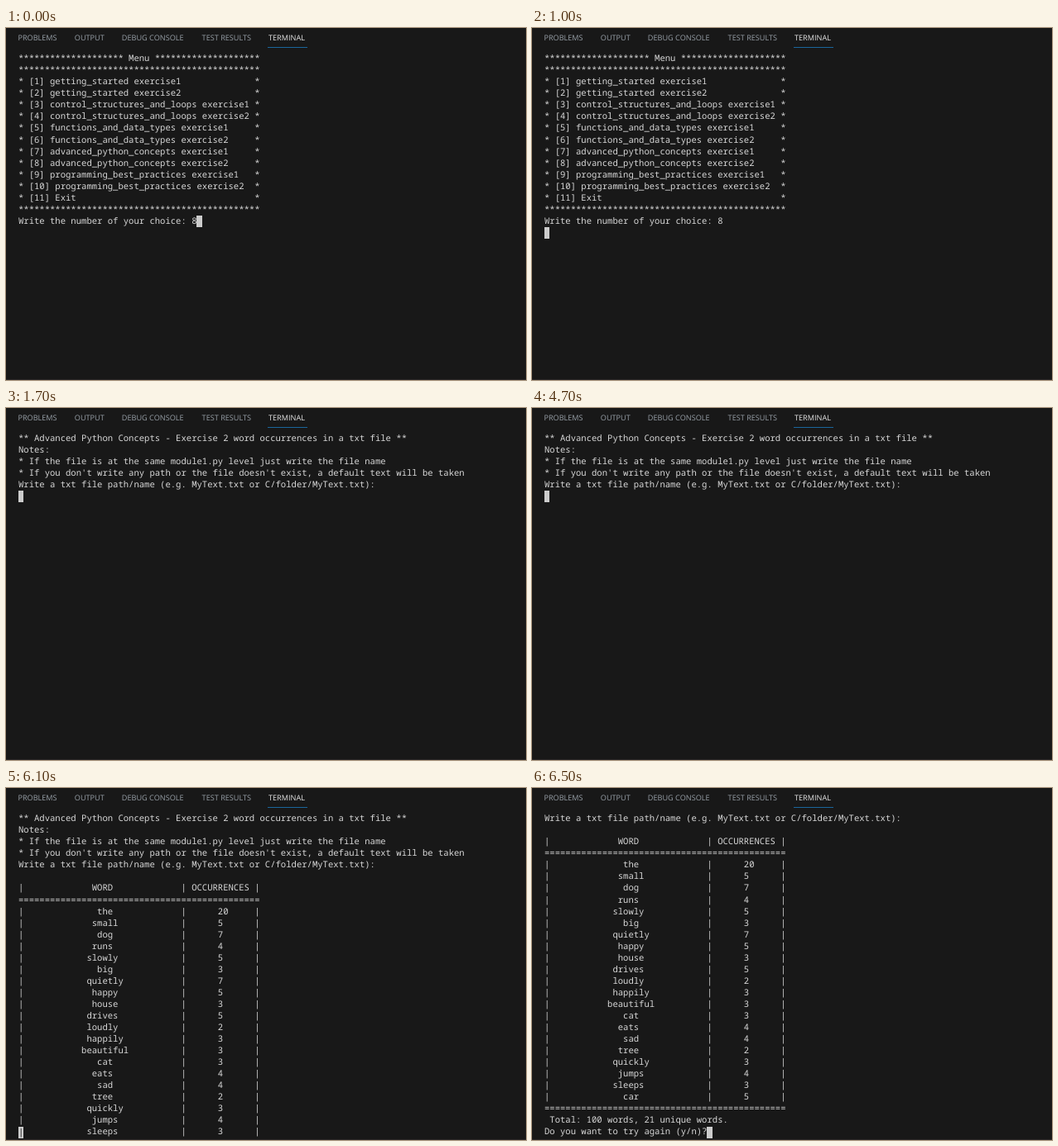
An HTML page for the animation above (8 s loop, 628 by 426 pixels).

```html
<!DOCTYPE html>
<html lang="en">
<head>
<meta charset="utf-8">
<title>Terminal</title>
<style>
html, body { margin: 0; width: 100%; height: 100%; overflow: hidden; background: #181818; }
body { position: relative; text-rendering: geometricPrecision; }
nav span {
  position: absolute; top: 5px; white-space: pre;
  font: 9.15px/14px "Open Sans", "Noto Sans", sans-serif; color: #98a0a8;
}
nav span.on { color: #e7e7e7; }
nav i { position: absolute; left: 316px; top: 23px; width: 48px; height: 1px; background: #1b669c; }
#term {
  position: absolute; left: 15px; top: 30.2px; margin: 0; color: #d8d8d8;
  font: 500 10.573px/14.05px "Noto Sans Mono", "DejaVu Sans Mono", monospace;
  font-variant-ligatures: none;
}
#text { margin: 0; font: inherit; white-space: pre; }
#cursor {
  position: absolute; width: 1ch; height: 1lh; white-space: pre;
  background: #ccc; color: #181818;
}
#edge { position: absolute; left: 0; right: 0; bottom: 0; height: 1px; background: #2b2728; }
</style>
</head>
<body>
<nav>
  <span style="left:14.4px">PROBLEMS</span>
  <span style="left:82.8px">OUTPUT</span>
  <span style="left:139.8px">DEBUG CONSOLE</span>
  <span style="left:236.6px">TEST RESULTS</span>
  <span class="on" style="left:317px">TERMINAL</span>
  <i></i>
</nav>
<div id="term"><pre id="text"></pre><div id="cursor"></div></div>
<div id="edge"></div>
<script>
const LOOP = 8000, WIDTH = 46;
const textEl = document.getElementById('text');
const cursorEl = document.getElementById('cursor');

const center = (s, width) => {
  const left = Math.floor((width - s.length) / 2);
  return (' '.repeat(left) + s).padEnd(width);
};
const tableRow = (word, count) => `| ${center(word, 29)}| ${center(count, 12)}|`;

const stars = '*'.repeat(WIDTH), rule = '='.repeat(WIDTH);
const topics = ['getting_started', 'control_structures_and_loops', 'functions_and_data_types',
  'advanced_python_concepts', 'programming_best_practices'];
const options = [...topics.flatMap(t => [`${t} exercise1`, `${t} exercise2`]), 'Exit'];
const menu = [
  `${'*'.repeat(20)} Menu ${'*'.repeat(20)}`,
  stars,
  ...options.map((o, i) => `* [${i + 1}] ${o}`.padEnd(WIDTH - 1) + '*'),
  stars,
  'Write the number of your choice: 8'
];

const intro = [
  '** Advanced Python Concepts - Exercise 2 word occurrences in a txt file **',
  'Notes:',
  '* If the file is at the same module1.py level just write the file name',
  "* If you don't write any path or the file doesn't exist, a default text will be taken",
  'Write a txt file path/name (e.g. MyText.txt or C/folder/MyText.txt):'
];

const counts = ('the 20,small 5,dog 7,runs 4,slowly 5,big 3,quietly 7,happy 5,house 3,drives 5,loudly 2,' +
  'happily 3,beautiful 3,cat 3,eats 4,sad 4,tree 2,quickly 3,jumps 4,sleeps 3,car 5').split(',');
const table = [
  '',
  tableRow('WORD', 'OCCURRENCES'),
  rule,
  ...counts.map(c => tableRow(...c.split(' ')))
];
const result = [
  intro[4], ...table, rule,
  ' Total: 100 words, 21 unique words.',
  'Do you want to try again (y/n)?'
];

// Each screen: start time, lines, cursor row and column
const screens = [
  [0, menu, 14, 34],
  [1000, menu, 15, 0],
  [1600, [], 0, 0],
  [1700, intro, 5, 0],
  [6100, [...intro, ...table.slice(0, -1)], 27, 0],
  [6500, result, 27, 31]
];

let shown;
function draw() {
  const t = performance.now() % LOOP;
  const screen = screens.findLast(s => s[0] <= t);
  if (screen !== shown) {
    shown = screen;
    const [, lines, row, col] = screen;
    textEl.textContent = lines.join('\n');
    cursorEl.textContent = (lines[row] || '')[col] || ' ';
    cursorEl.style.left = `${col}ch`;
    cursorEl.style.top = `${row}lh`;
  }
  requestAnimationFrame(draw);
}
draw();
</script>
</body>
</html>
```
